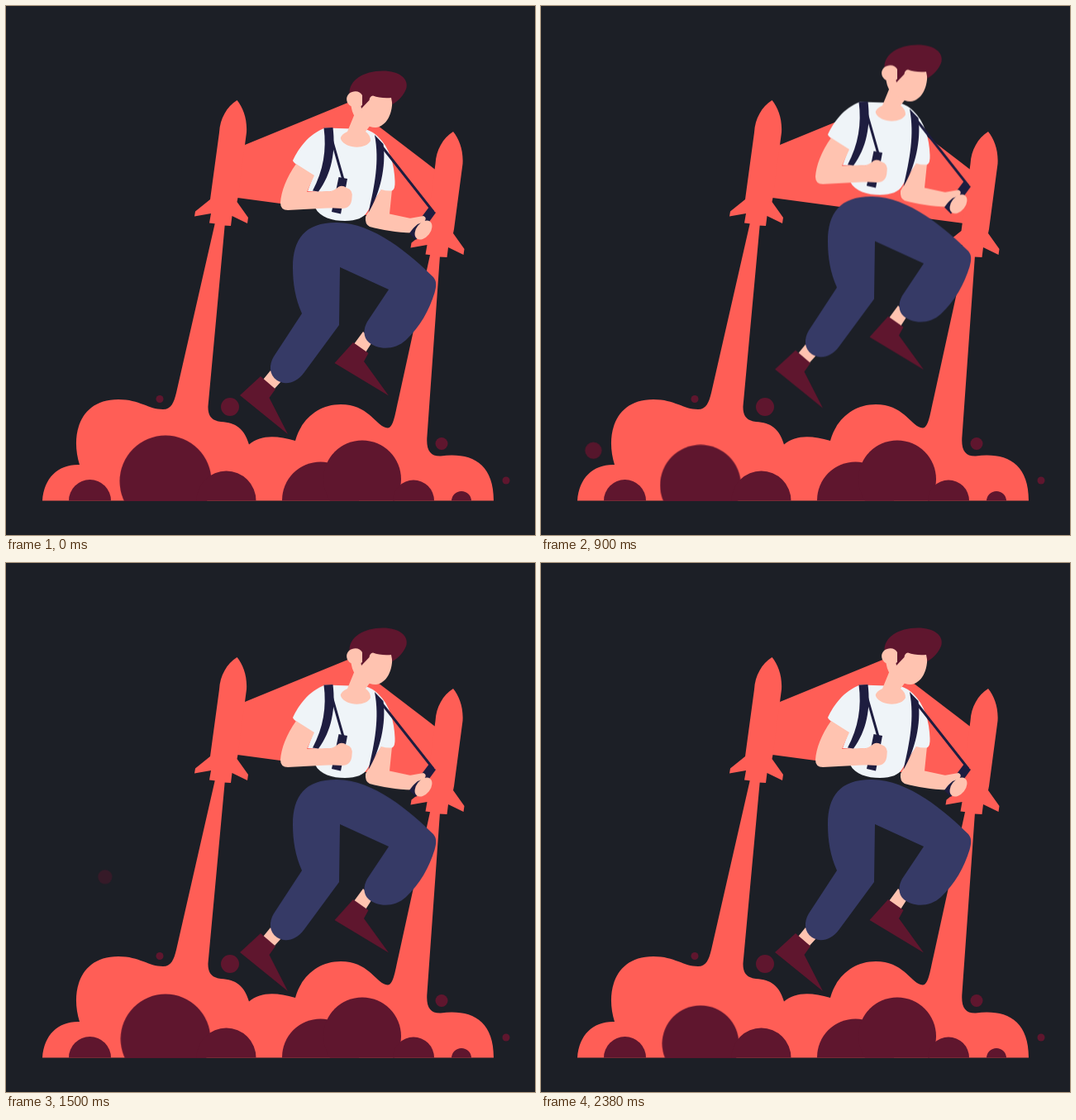
Animation of 640 by 640 pixels, one loop 2.42 s. Source, as an HTML page:

```html
<!DOCTYPE html>
<html lang="en">
<head>
<meta charset="utf-8">
<title>Jetpack</title>
<style>
  html, body { margin: 0; width: 100%; height: 100%; overflow: hidden; background: #1c1f26; }
  svg { display: block; width: 100%; height: 100%; }
  .coral { fill: #ff5e56; }
  .wine { fill: #5f162e; }
  .skin { fill: #ffc3b0; }
  .shirt { fill: #eff4f8; }
  .pants { fill: #363a66; }
  .ink { fill: #1e1d40; }
  .cord { fill: none; stroke: #1e1d40; stroke-width: 3; }
  #man, #puff, #spark { animation: 2.42s linear infinite; }
  #man { animation-name: hover; }
  #puff { animation-name: puff; transform-origin: 193px 615px; }
  #spark { animation-name: fall; transform-origin: 0 0; }

  @keyframes hover {
    0%, 98.35%, 100% { transform: translateY(0); }
    41.32% { transform: translateY(-35px); }
    61.98% { transform: translateY(0); }
    82.64% { transform: translateY(17.5px); }
  }
  @keyframes puff {
    0%, 58.68% { transform: scale(1); }
    28.93%, 85.2%, 100% { transform: scale(.836); }
  }
  @keyframes fall {
    0%, 45.29% { transform: translate(193px, 232px) scale(.7); opacity: 0; }
    42.07%, 45.28% { transform: translate(46.5px, 577.5px) scale(1); opacity: 1; }
    86.78%, 88.84% { transform: translate(11.5px, 598px) scale(1); opacity: 1; }
    88.85%, 100% { transform: translate(11.5px, 598px) scale(1); opacity: 0; }
  }
</style>
</head>
<body>
<svg viewBox="0 0 640 640">
  <defs>
    <clipPath id="ground"><path d="M0 0H640V598.5H0Z"/></clipPath>
    <path id="rocket" d="M279.500 114C267 122 259 136 258 153L247 234L229 248.500L228 254.500L248 251L246 262.500L254 263.500L253.500 265L272 266L273.500 254L292 263L293 256L279.500 237L280.500 232L289 168L291 153C292 137 287 123 279.500 114Z"/>
  </defs>

  <g class="coral">
    <path d="M289 168L413.500 117L520 198.500L511 263L280 232L262 200Z"/>
    <use href="#rocket"/>
    <use href="#rocket" x="261.500" y="38"/>
    <path d="M44 598.500C46 570 64 554 89 555C78 520 88 476 136 476C162 476 172 488 190 488C200 488 203 480 206 468L253 262L265 262L244.500 484C244 496 249 502 260 503C278 504 288 511 294 530.500C308 519 326 519 350 526C357 500 378 482 405 482C440 482 448 510 462 510.500C469 510 471 492 475 475L513.500 299L525 302L509.500 520C508 537 513 545 526 544.500C562 540 590 552 590 598.500Z"/>
  </g>

  <g class="wine" clip-path="url(#ground)">
    <circle cx="101.500" cy="598.500" r="25.500"/>
    <circle id="puff" cx="193" cy="575" r="55.500"/>
    <circle cx="266.500" cy="598.500" r="36"/>
    <circle cx="380.500" cy="598" r="46.500"/>
    <circle cx="431" cy="572.500" r="47"/>
    <circle cx="493" cy="598.500" r="25"/>
    <circle cx="551" cy="599" r="12"/>
  </g>
  <g class="wine">
    <circle cx="186" cy="475.500" r="4.500"/>
    <circle cx="271" cy="485" r="11"/>
    <circle cx="527" cy="529.500" r="7.500"/>
    <circle cx="605" cy="574" r="4.500"/>
  </g>
  <g clip-path="url(#ground)"><circle id="spark" class="wine" r="10.500"/></g>

  <g id="man">
    <path class="skin" d="M320 441L334 453L324 464L311 452ZM432 394L444 405L435 419L421 409Z"/>
    <path class="wine" d="M283 471L308 448L326 463.500L318.500 474L341 518ZM397.500 432L420 407L438.500 420L433 430L463 471.500Z"/>
    <path class="pants" d="M347 316C347 282 362 262 399 262C443 261 490 301 517 328C521 333 521 338 518.500 347C512 368 501 388 484 404C470 417 450 416 439 407C432 401 432 391 437 382L463 343L404 316L403 386L361 443C351 457 337 459 328 453C318 446 318 434 324 424L358 372C350 354 347 336 347 316Z"/>

    <path class="skin" d="M456 218L435 255Q434 264 440 267C455 271 472 274 492 274.500L503 270L507 254L492 257.500L464 251.500L467 222Z"/>
    <path class="shirt" d="M386 147.500C366 155 354 172 347 187Q348 191 372 205L365 224L382 225L393 224L400 243L374 244C380 256 395 260 410 260C424 260 433 256 437 249L454 222Q460 224 467 223.500Q471 222 470.500 212C470 192 464 171 450 158Q444 152 435 149Z"/>
    <path class="skin" d="M351 191C339 208 333 224 332 238Q332 247 341 247L398 244L392 224L364 225L373 205Z"/>
    <path class="skin" d="M422 130L413 152Q404 156 405 161C410 173 436 174 441 163Q441 156 435 152L441 144Z"/>

    <path class="ink" d="M384.500 147.500L395.500 147C399 176 394 203 378 224.500L371 223.500C384 199 388 174 384.500 147.500Z"/>
    <path class="ink" d="M446 156L456.500 167C460 194 453 226 438.500 250C446 217 452 188 446 156Z"/>
    <path class="cord" d="M394 161L408 210M450 164L517 249"/>
    <path class="ink" d="M402.500 207L413 209L405 251.500L394 249Z"/>
    <path class="skin" d="M388 225Q397 224 402 219Q407 216 412 220Q420 222 418.500 232Q418 245 406 245L388 244Z"/>

    <path class="ink" d="M512 243L520 250L496 283L488 275Z"/>
    <path class="skin" d="M488 257L505 254Q510 256 506 261L498 264L488 273Z"/>
    <ellipse class="skin" cx="505" cy="271" rx="8.500" ry="13" transform="rotate(38 505 271)"/>

    <path class="skin" d="M417 112C417 128 421 137 433 142Q440 147 447 147C460 146 469 130 467 110L452 98L424 101Z"/>
    <path class="wine" d="M415.500 106C415 90 432 78.500 456 78.500C476 78.500 487 88 484.500 99C482 107 475 115 467.500 119L466 111Q453 112 444 108.500Q440 109 439.500 114L430 124L427 108Z"/>
    <path class="skin" d="M431 108C428 102 420 102 415 106C410 111 412 118 417 121Q425 125 431 120Z"/>
  </g>
</svg>
</body>
</html>
```
